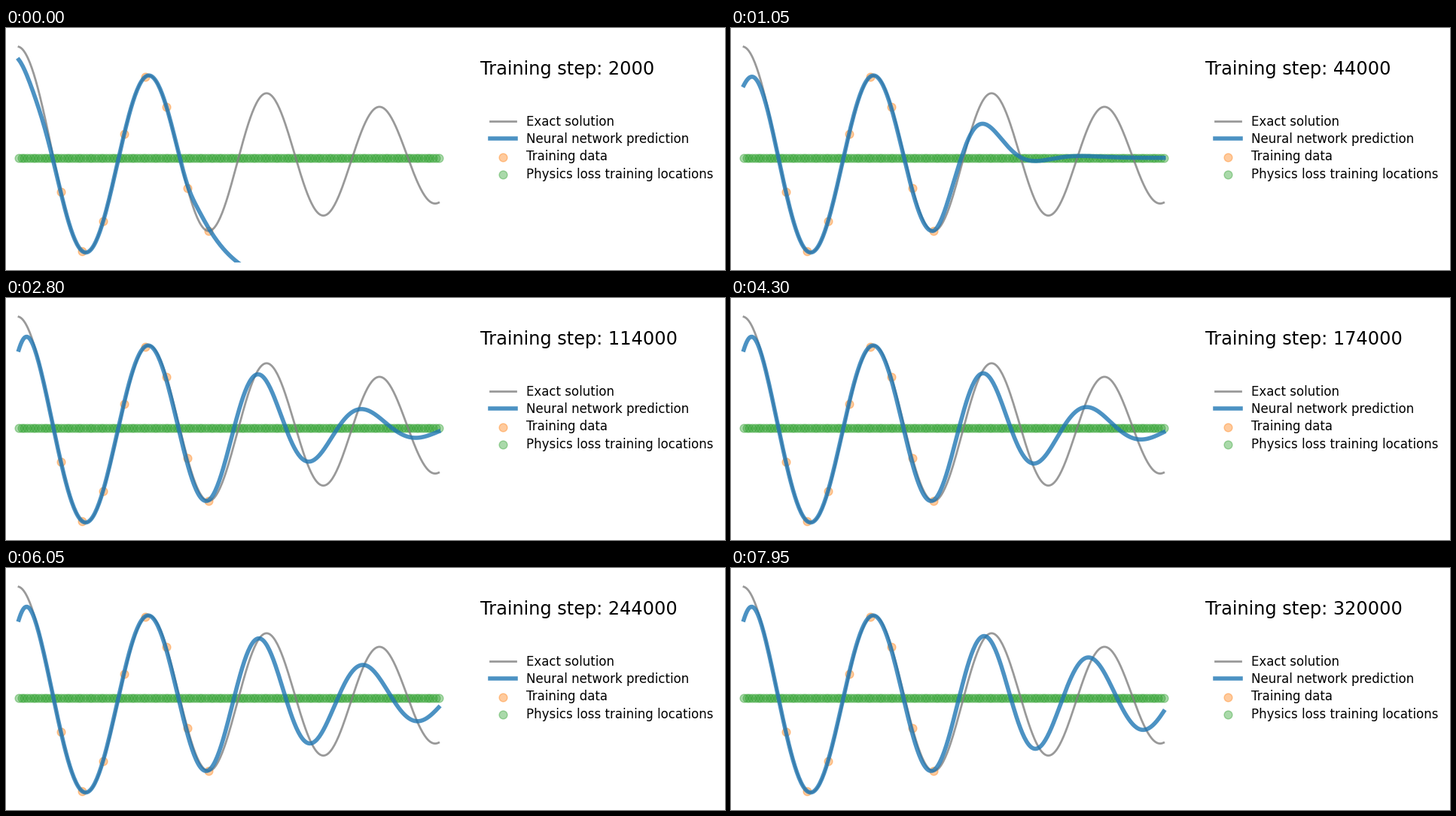
A matplotlib script that plays this animation: 955x322 px, repeating every 8000 ms.

```python
import numpy as np
import matplotlib.pyplot as plt
from matplotlib.animation import FuncAnimation

W, H, DPI = 955, 322, 100
FRAMES, INTERVAL = 160, 50
LEFT, SPAN, MID = 17, 557.7, 173

t = np.linspace(0, SPAN, 420)
halves = np.linspace(0, 9, 2000)  # half swings made so far


def swing(lag=0, damp=0):
    """Decaying oscillation whose period shortens as it loses height.

    lag pulls the later swings forward, damp flattens those after the third.
    """
    when = 73.1 * halves + 43.5 * (1 - np.exp(-0.5 * halves))
    when -= lag * 11 * (1 + np.tanh((halves - 4.2) / 1.4))
    n = np.interp(t, when, halves)
    height = 148 * np.exp(-0.117 * n - 0.075 * (1 - np.exp(-n)))
    height *= np.exp(-damp * np.clip(n - 3, 0, None) ** 1.5)
    return height * np.cos(np.pi * n)


def prediction(ms):
    early = [0, 400, 1700]
    lag = np.interp(ms, early, [0, 0, 1])
    damp = np.exp(np.interp(ms, [400, 1700, 2800, 4300, 6050, 7950],
                            np.log([2.95, 0.245, 0.195, 0.175, 0.085, 0.045])))
    y = MID - swing(lag, damp)

    # Gap to the exact curve at the start
    size = np.interp(ms, early, [27, 63.5, 85])
    centre = np.interp(ms, early, [16, -17, -16.6])
    width = np.interp(ms, early, [24, 34.8, 20.4])
    y += size * np.exp(-((t - centre) / width) ** 2)

    # Low hump beyond the data before the later swings appear
    m = np.clip((t - 291) / 45, 0, None)
    y -= np.interp(ms, early, [33, 33, 0]) * m * np.exp(-m)

    # The untrained tail drops away and quickly recovers
    slump = max(0, 1 - ms / 400) ** 2.5
    fall = 350 - 84 * np.exp((252 - t) / 49)
    return y + slump * (fall - y) / (1 + np.exp((228 - t) / 6))


plt.rcParams["font.family"] = "DejaVu Sans"
fig = plt.figure(figsize=(W / DPI, H / DPI), dpi=DPI, facecolor="white")
ax = fig.add_axes([0, 10 / H, 1, (H - 10) / H])
ax.set_xlim(0, W)
ax.set_ylim(H - 10, 0)
ax.axis("off")

GREY = dict(color="grey", lw=2, alpha=0.8)
BLUE = dict(color="tab:blue", lw=4, alpha=0.8)


def dots(x, y, color):
    ax.scatter(x, y, s=60, color=color, alpha=0.4)


exact = MID - swing()
samples = 28 * np.arange(2, 10)
dots(LEFT + samples, np.interp(samples, t, exact), "tab:orange")
spots = np.linspace(LEFT, LEFT + SPAN, 150)
dots(spots, np.full(spots.size, MID), "tab:green")

ax.plot(LEFT + t, exact, **GREY)
curve, = ax.plot(LEFT + t, prediction(0), **BLUE)

# Legend
labels = ["Exact solution", "Neural network prediction", "Training data",
          "Physics loss training locations"]
rows = 124.2 + 23.2 * np.arange(4)
for y, label in zip(rows, labels):
    ax.text(690.8, y + 5.8, label, fontsize=12, va="baseline")
for y, style in zip(rows, (GREY, BLUE)):
    ax.plot([643.3, 676.7], [y, y], **style)
for y, color in zip(rows[2:], ("tab:orange", "tab:green")):
    dots([660], [y + 1.4], color)

title = ax.text(630, 62, "", fontsize=17.28, va="baseline")


def update(frame):
    curve.set_ydata(prediction(frame * INTERVAL))
    title.set_text(f"Training step: {2000 * (frame + 1)}")
    return curve, title


anim = FuncAnimation(fig, update, frames=FRAMES, interval=INTERVAL,
                     repeat=True, repeat_delay=0)
plt.show()
```
